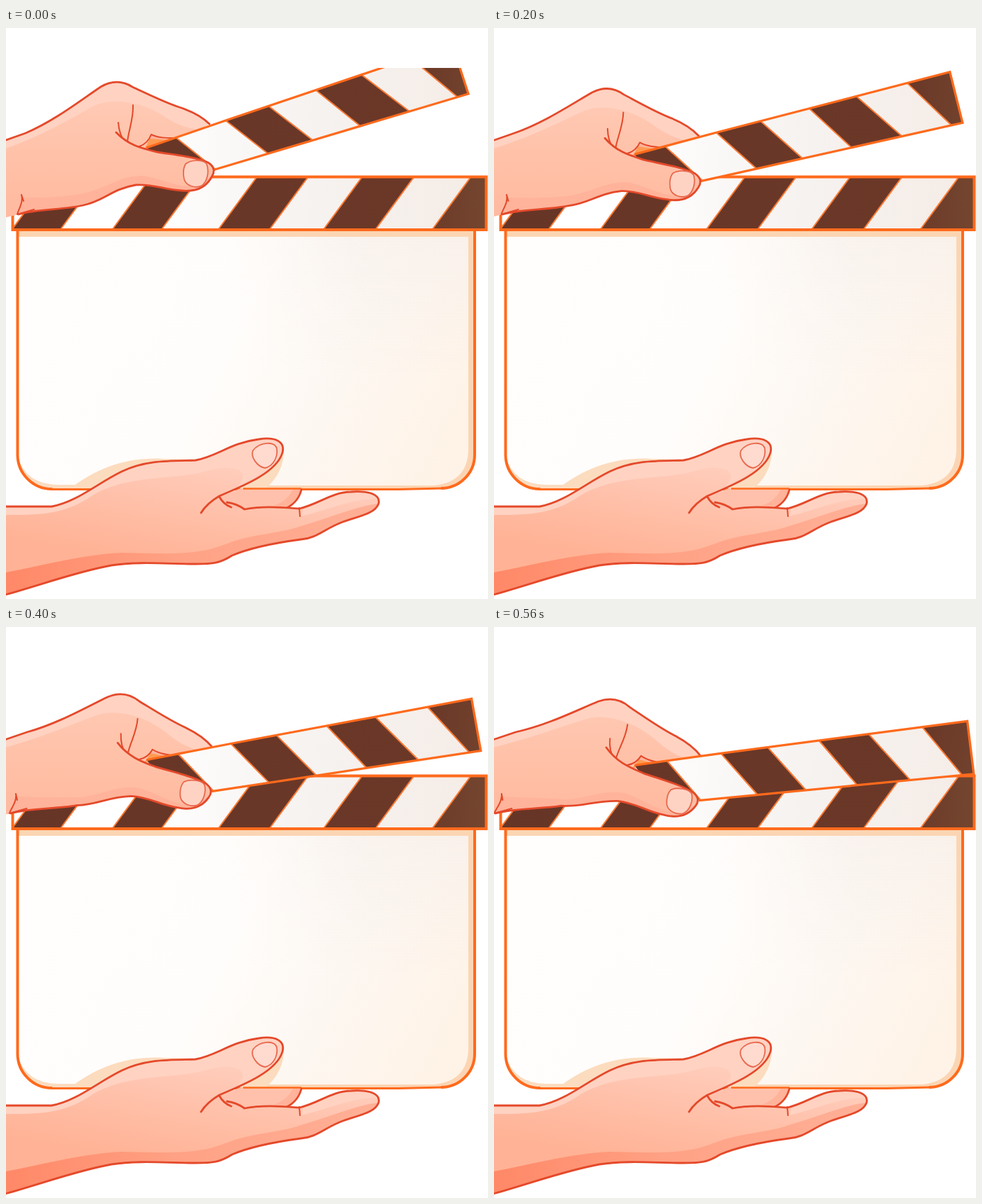
Write an HTML page that moves like this. It is 687 px wide and 815 px high and loops after 0.8 s.

```html
<!DOCTYPE html>
<html lang="en">
<head>
<meta charset="utf-8">
<title>Clapperboard</title>
<style>
  html, body { margin: 0; width: 100%; height: 100%; overflow: hidden; background: #fff; }
  svg { display: block; width: 687px; height: 815px; }
  .brown { fill: url(#wood); }
  .seam { fill: none; stroke: #fb7a35; stroke-width: 2; }
  .edge { fill: none; stroke: #ff6a1c; stroke-width: 3.2; stroke-linejoin: miter; }
  .line { fill: none; stroke: #e4492a; stroke-width: 2.8; stroke-linecap: round; stroke-linejoin: round; }
  .fine { stroke-width: 2; }
  .nail { fill: #ffd3c4; stroke: #e8694d; stroke-width: 1.8; }
  .lit { fill: #ffd2c2; }
  .dim { fill: #ffb39a; }
</style>
</head>
<body>
<svg viewBox="0 0 687 815">
  <defs>
    <linearGradient id="paper" x1="0" y1=".35" x2="1" y2=".65">
      <stop offset="0" stop-color="#fffefd"/>
      <stop offset=".45" stop-color="#fffdfb"/>
      <stop offset=".72" stop-color="#fdf7f1"/>
      <stop offset="1" stop-color="#fff3e7"/>
    </linearGradient>
    <linearGradient id="haze" x2="0" y2="1">
      <stop offset="0" stop-color="#f5ede8" stop-opacity=".6"/>
      <stop offset=".55" stop-color="#f8f1ec" stop-opacity="0"/>
    </linearGradient>
    <linearGradient id="fade">
      <stop offset=".45" stop-color="#000"/>
      <stop offset=".75" stop-color="#fff"/>
    </linearGradient>
    <mask id="right"><rect width="687" height="815" fill="url(#fade)"/></mask>
    <linearGradient id="white" gradientUnits="userSpaceOnUse" x1="200" y1="0" x2="680" y2="0">
      <stop offset="0" stop-color="#fff"/>
      <stop offset=".45" stop-color="#f6f3f1"/>
      <stop offset="1" stop-color="#f5ece6"/>
    </linearGradient>
    <linearGradient id="wood" gradientUnits="userSpaceOnUse" x1="0" y1="0" x2="687" y2="0">
      <stop offset="0" stop-color="#663526"/>
      <stop offset=".85" stop-color="#6b3828"/>
      <stop offset="1" stop-color="#74462f"/>
    </linearGradient>
    <linearGradient id="palm" gradientUnits="userSpaceOnUse" x1="260" y1="600" x2="230" y2="770">
      <stop offset="0" stop-color="#ffd0c0"/>
      <stop offset=".5" stop-color="#ffc0a9"/>
      <stop offset="1" stop-color="#ffb295"/>
    </linearGradient>
    <linearGradient id="under" gradientUnits="userSpaceOnUse" x1="0" y1="0" x2="530" y2="0">
      <stop offset="0" stop-color="#ff8867"/>
      <stop offset=".45" stop-color="#ffa184"/>
      <stop offset="1" stop-color="#ffb097"/>
    </linearGradient>
    <linearGradient id="skin" gradientUnits="userSpaceOnUse" x1="0" y1="90" x2="0" y2="265">
      <stop offset="0" stop-color="#ffcbb6"/>
      <stop offset=".55" stop-color="#ffc1a8"/>
      <stop offset="1" stop-color="#ffbaa0"/>
    </linearGradient>
    <clipPath id="top"><rect y="57" width="687" height="758"/></clipPath>
    <clipPath id="slate"><path d="M16,289H668V609A48,48 0 0 1 620,657H66A49,49 0 0 1 16,608Z"/></clipPath>
    <clipPath id="bar"><rect x="9" y="212" width="676" height="76"/></clipPath>
  </defs>

  <!-- slate -->
  <g clip-path="url(#slate)">
    <rect x="16" y="288" width="653" height="372" fill="url(#paper)"/>
    <rect x="16" y="288" width="653" height="372" fill="url(#haze)" mask="url(#right)"/>
    <path fill="#fbd5b3" d="M16,288H669V660H370V653H610Q659,648 659,600V298H16Z"/>
    <path fill="#fcdcc0" d="M16,610Q28,652 75,652H110V660H16Z"/>
    <path fill="#fcdcbe" d="M97,653C135,626 175,612 225,615L280,616L300,660H97ZM396,600C397,625 385,645 370,657H320L345,630Z"/>
  </g>
  <path class="edge" style="stroke-width:4" d="M16.500,289V609A49,49 0 0 0 66,658"/>
  <path class="edge" style="stroke-width:4" d="M668,289V609A48,48 0 0 1 620,657"/>
  <path class="edge" style="stroke-width:3" d="M64,658.500H560L622,657"/>

  <!-- lower bar -->
  <g clip-path="url(#bar)">
    <rect x="9" y="212" width="676" height="76" fill="url(#white)"/>
    <g id="stripes"></g>
  </g>
  <rect class="edge" style="stroke-width:4" x="9.500" y="212.500" width="675" height="75.500"/>

  <!-- lower hand -->
  <path fill="#ffc1ac" d="M296,672L335,657H421C419,670 411,679 402,688L330,694L290,690Z"/>
  <path class="dim" d="M421,658C419,670 411,679 402,686L376,684Q402,676 409,658Z"/>
  <path class="edge" style="stroke-width:2.500" d="M338,657.500H421"/>
  <path class="line" d="M421,659C418,671 410,680 400,685"/>
  <path fill="url(#palm)" d="M-5,683H65C100,677 130,650 165,633C200,616 235,618 270,617C300,612 320,592 360,587C385,583 398,591 394,606C386,634 340,653 304,668L318,684L340,687C365,682 390,684 418,686C445,680 465,662 492,662C520,660 534,667 531,679C526,693 505,696 480,705C455,714 442,729 420,730C390,734 350,741 322,753C305,764 295,765 270,765C230,765 190,761 150,767C100,776 50,795 -5,810Z"/>
  <path class="lit" d="M0,684H65C100,677 130,651 165,634C200,617 235,619 270,618C300,613 320,593 360,588C385,584 396,592 393,606C386,625 355,643 330,654C350,635 330,618 280,634C235,645 170,638 122,668C90,690 60,696 0,695ZM424,686C445,680 467,664 492,663C512,662 526,665 529,672C490,672 455,690 420,697Z"/>
  <path fill="url(#under)" d="M-5,778C50,768 105,752 165,749C230,750 270,754 315,736C350,722 390,722 420,711C460,700 500,682 531,679C526,693 505,696 480,705C455,714 442,729 420,730C390,734 350,741 322,753C305,764 295,765 270,765C230,765 190,761 150,767C100,776 50,795 -5,810Z"/>
  <path class="line" d="M-5,683H65C100,677 130,650 165,633C200,616 235,618 270,617C300,612 320,592 360,587C385,583 398,591 394,606C386,634 340,653 304,668C294,674 284,682 278,692M304,669Q310,680 321,684M315,677Q329,679 340,687C365,682 390,684 418,686C445,680 465,662 492,662C520,660 534,667 531,679C526,693 505,696 480,705C455,714 442,729 420,730C390,734 350,741 322,753C305,764 295,765 270,765C230,765 190,761 150,767C100,776 50,795 -5,810"/>
  <path class="line fine" d="M418,685L419,697"/>
  <path class="nail" style="fill:#ffdacf" d="M352,603C361,591 383,589 386,600C388,613 380,626 369,628C358,626 348,612 352,603Z"/>

  <!-- clap stick and upper hand -->
  <g clip-path="url(#top)">
    <g id="back"></g>
    <g id="stick">
      <path fill="url(#white)" d="M200,171L313,132L636,23L659,94L300,201L230,200Z"/>
      <path class="brown" d="M200,171L243,157L299,202L230,200ZM313,132L375,112L437,160L373,179ZM442,89L507,67L575,119L505,140ZM577,43L636,23L659,94L644,99Z"/>
      <path class="seam" d="M243,157L299,202M313,132L373,179M375,112L437,160M442,89L505,140M507,67L575,119M577,43L644,99"/>
      <path class="edge" d="M200,171L313,132L636,23L659,94L296,202.500"/>
    </g>
    <g id="front"></g>
  </g>
</svg>
<script>
  const STEP = 40, STEPS = 14, LOOP = 800;
  const NS = 'http://www.w3.org/2000/svg';
  const el = id => document.getElementById(id);

  function addPath(parent, cls, d, fill) {
    const p = document.createElementNS(NS, 'path');
    p.setAttribute('d', d);
    if (cls) p.setAttribute('class', cls);
    if (fill) p.setAttribute('fill', fill);
    el(parent).appendChild(p);
    return p;
  }

  // slanted stripes of the lower bar: left and right foot of each
  for (const [a, b] of [[9, 78], [152, 222], [303, 376], [453, 527], [608, 690]]) {
    addPath('stripes', 'brown', `M${a},287L${a + 55},212H${b + 55}L${b},287Z`);
    addPath('stripes', 'seam', `M${a},287L${a + 55},212M${b},287L${b + 55},212`);
  }

  const crown = 'M-15,165L0,160L28,150C70,132 108,102 135,84C150,75 166,75 180,84C210,98 230,108 250,114C270,121 283,130 290,137';
  const thumbTop = 'C175,168 195,172 215,177C240,181 270,184 288,192C298,198 297,206 294,211';
  const palmLow = 'C225,231 210,222 185,224C150,230 140,247 110,253C80,260 45,258 18,266';
  const thumbLow = 'C285,229 268,234 250,232' + palmLow;
  const hand = [];
  const part = (...args) => {
    const p = addPath(...args);
    hand.push([p, p.getAttribute('d')]);
  };

  part('back', '', crown + 'L245,157L228,162L205,172L250,232' + palmLow + 'L-15,274Z', 'url(#skin)');
  part('back', 'lit', crown + 'L275,145C255,143 240,136 222,124C190,104 150,100 126,111C90,130 60,150 0,172L-15,176Z');
  part('back', 'dim', 'M207,152C220,158 235,160 252,154L200,171Z');
  part('back', '', 'M205,158L232,160L198,172Z', '#ff9b52');
  part('back', 'line', crown);
  part('back', 'line fine', 'M181,110C182,130 174,148 173,163M160,135C161,148 164,156 170,163M243,157C228,157 217,157 207,152C204,160 199,166 190,169');

  part('front', '', 'M157,149' + thumbTop + thumbLow + 'L60,220Z', 'url(#skin)');
  part('front', 'dim', 'M18,266L24,242C55,243 90,241 115,235C150,225 165,210 195,211C220,215 240,226 262,226L294,211' + thumbLow + 'Z');
  part('front', 'line', 'M157,149' + thumbTop + thumbLow);
  part('front', 'line fine', 'M22,238C25,249 18,258 16,266M22,238L25,247M16,266L40,259');
  part('front', 'nail', 'M256,194C263,188 281,187 286,194C290,205 287,219 279,225C270,229 257,226 254,216C252,207 253,199 256,194Z');

  // hand swings from the wrist, the forearm stays put
  const warp = (d, s) => d.replace(/(-?[\d.]+),(-?[\d.]+)/g, (m, a, b) => {
    const x = +a, y = +b;
    const dx = -.16 * (y - 168);
    const dy = Math.max(0, .18 * (x - 35) + .05 * (170 - y) - .4 * Math.max(0, y - 235));
    return (x + dx * s).toFixed(2) + ',' + (y + dy * s).toFixed(2);
  });

  let last = -1;
  function draw(now) {
    const step = Math.min(STEPS, Math.floor(now % LOOP / STEP));
    if (step !== last) {
      last = step;
      const s = step / STEPS;
      el('stick').setAttribute('transform',
        `matrix(${1 + .02 * s},${.195 * s},${-.2 * s},1,${30.5 * s},${-12.7 * s})`);
      for (const [p, d] of hand) p.setAttribute('d', warp(d, s));
    }
  }

  let start;
  function tick(now) {
    start ??= now;
    draw(Math.max(0, now - start));
    requestAnimationFrame(tick);
  }
  draw(0);
  requestAnimationFrame(tick);
</script>
</body>
</html>
```
